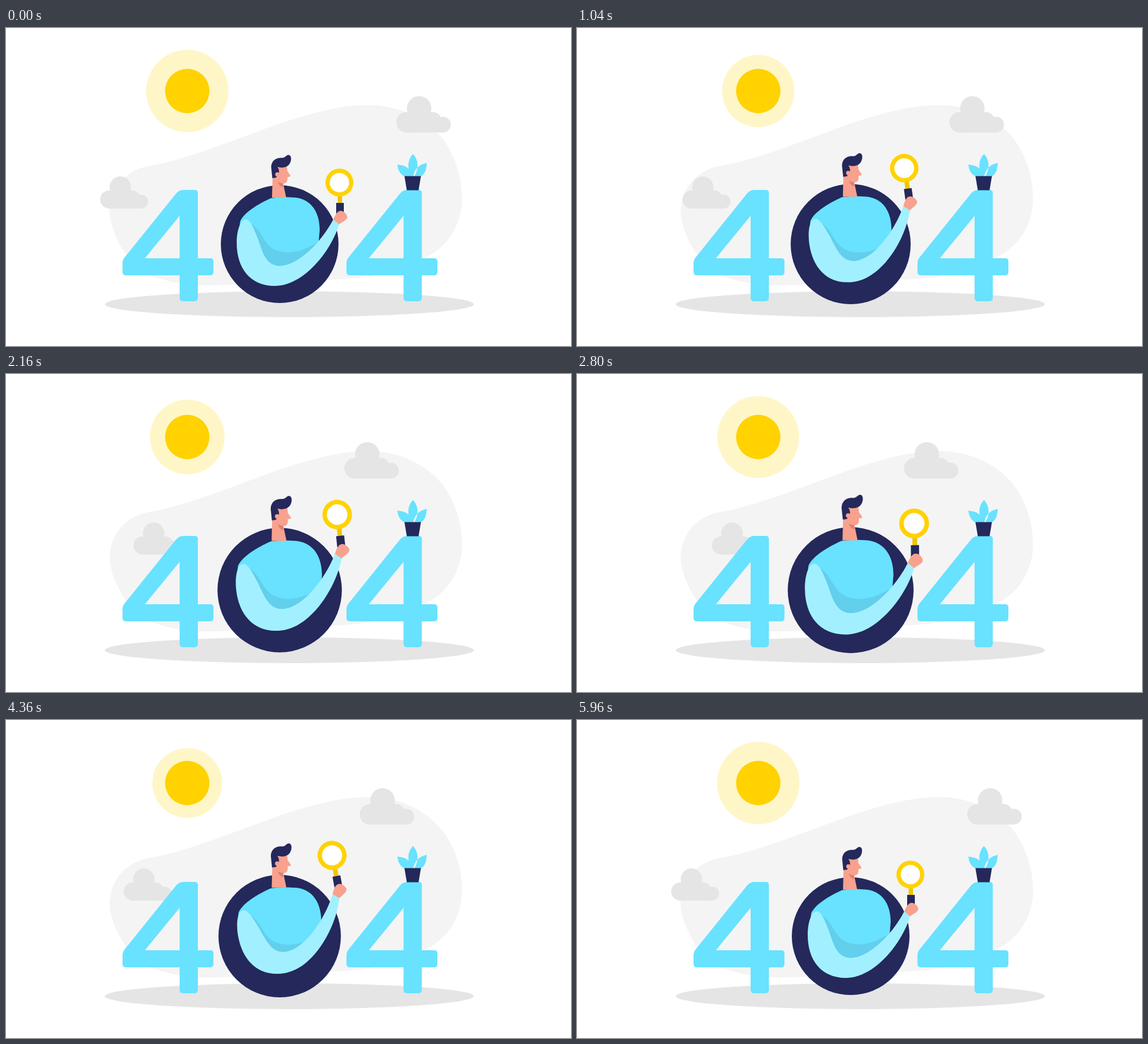
Recreate the animation shown at these times as an HTML page. Size 960 by 540 pixels, loop 6000 ms.

```html
<!DOCTYPE html>
<html lang="en">
<head>
<meta charset="utf-8">
<title>404</title>
<style>
  html, body { margin: 0; width: 100%; height: 100%; overflow: hidden; background: #fff; }
  svg { display: block; width: 100%; height: 100%; }
  .sky { fill: #68e2ff; }
  .navy { fill: #24285b; }
  .skin { fill: #f8a18e; }
  .sun { fill: #ffd200; }
  .grey { fill: #e5e5e5; }
</style>
</head>
<body>
<svg viewBox="0 0 960 540">
  <defs>
    <!-- Origin is the left end of the flat base -->
    <g id="cloud" class="grey">
      <circle cx="17.4" cy="-17.4" r="17.4"/>
      <circle cx="39" cy="-41" r="20.8"/>
      <circle cx="61" cy="-18.5" r="16.5"/>
      <circle cx="79.3" cy="-13.4" r="13.4"/>
      <rect x="17" y="-25" width="62.3" height="25"/>
    </g>
    <path id="four" class="sky" fill-rule="evenodd" d="M301 275H321Q326 275 326 280V391H347Q352.500 391 352.500 396V414Q352.500 420 347 420H326V458Q326 464 320 464H301Q295 464 295 458V420H204Q198 420 198 414V399Q198 394 202 389L289 281Q294 275 301 275ZM295 319V391H236Z"/>
  </defs>

  <path fill="#f4f4f4" d="M240 235C320 222 420 175 500 151C545 138 580 131 612 131C670 130 715 155 742 188C765 220 775 255 775 293C773 340 745 378 705 393C660 416 620 424 560 427C480 431 400 437 335 437C300 437 270 429 240 419C205 400 176 345 176 310C178 270 205 242 240 235Z"/>
  <circle id="halo" cx="308" cy="107" r="70" fill="#fff6c8"/>
  <circle class="sun" cx="308" cy="107" r="37.700"/>
  <use id="cloudR" href="#cloud"/>
  <use id="cloudL" href="#cloud"/>
  <ellipse class="grey" cx="481.500" cy="469" rx="313.500" ry="22"/>
  <use href="#four"/>
  <use href="#four" x="380.500"/>

  <path class="sky" d="M691.500 214C702 225 701 240 694 252H689C682 240 681 225 691.500 214ZM665 232C680 233 690 240 690 252H677C668 247 666 240 665 232ZM715 229C700 232 694 241 692 252H705C713 247 714 239 715 229Z"/>
  <path class="navy" d="M677 251.500H705L701 275.500H681Z"/>

  <g id="person">
    <circle class="navy" cx="465" cy="367" r="100"/>
    <path class="sky" d="M398 328C405 313 428 299 450 289C462 287 480 287 492 288C519 291 533 313 533 343L531 366C515 395 440 405 420 385C400 370 395 345 398 328Z"/>
    <path fill="#62cfec" d="M414 331C442 346 434 381 481 381C500 380 516 372 532 362L526 378C500 405 480 412 460 410C435 400 420 355 414 331Z"/>
    <path class="skin" d="M453 250L452 288H476L471 264C476 264 479 261 478 253C482 253 484 252 483 250L478 243L477 232H460Z"/>
    <path fill="#d9836f" d="M462 261Q466 264 471 264L470 271Q464 268 462 261Z"/>
    <path class="navy" d="M450.500 236C451 225 459 220 468 220.500C475 221 475 216 480 215.500C485 216 485 223 483.500 227C481 235 474 237 468 237L461 236Q464 239 464 245L459 254L452.500 255Z"/>
    <circle class="skin" cx="461" cy="248.500" r="3.600"/>
    <g id="arm">
      <path fill="#a2f0ff" d="M408 325C416 326 422 343 428 358C437 385 443 404 466 404C500 403 540 357 556 325L566 333C553 378 506 438 457 438C415 438 392 408 392 365C392 345 398 324 408 325Z"/>
      <rect x="563.500" y="282" width="7.500" height="17" fill="#f0c600"/>
      <circle class="sun" cx="566.500" cy="262.500" r="23.700"/>
      <circle cx="566.500" cy="262.500" r="16.500" fill="#fff"/>
      <rect class="navy" x="561" y="297" width="13" height="18"/>
      <path class="skin" d="M556 325C559 319 562 311 568 310.500C574 310 579 316 580 321C579 327 571 329 566 333.500Z"/>
    </g>
  </g>
</svg>
<script>
  const LOOP = 6000, STEP = 40;
  const [halo, cloudL, cloudR, person, arm] =
    ['halo', 'cloudL', 'cloudR', 'person', 'arm'].map(id => document.getElementById(id));

  // Eased 0 -> 1 -> 0 over one period
  function swing(t, period) {
    const u = 1 - Math.abs(1 - 2 * (t % period) / period);
    return u * u * (3 - 2 * u);
  }

  const setTransform = (el, value) => el.setAttribute('transform', value);

  function draw(now) {
    const t = Math.floor(now % LOOP / STEP) * STEP;
    const slow = swing(t, LOOP), fast = swing(t, LOOP / 2);
    halo.setAttribute('r', 70 - 11 * fast);
    setTransform(cloudR, `translate(${663 - 109 * slow} 177.5)`);
    setTransform(cloudL, `translate(${160 + 70 * slow} 306.5) scale(.88)`);
    setTransform(person, `translate(465 367) scale(${1 + .07 * slow}) translate(-465 -367)`);
    setTransform(arm, `rotate(${-10.5 * fast} 405.5 337.5)`);
  }

  const start = performance.now();
  function tick() {
    draw(performance.now() - start);
    requestAnimationFrame(tick);
  }
  tick();
</script>
</body>
</html>
```
